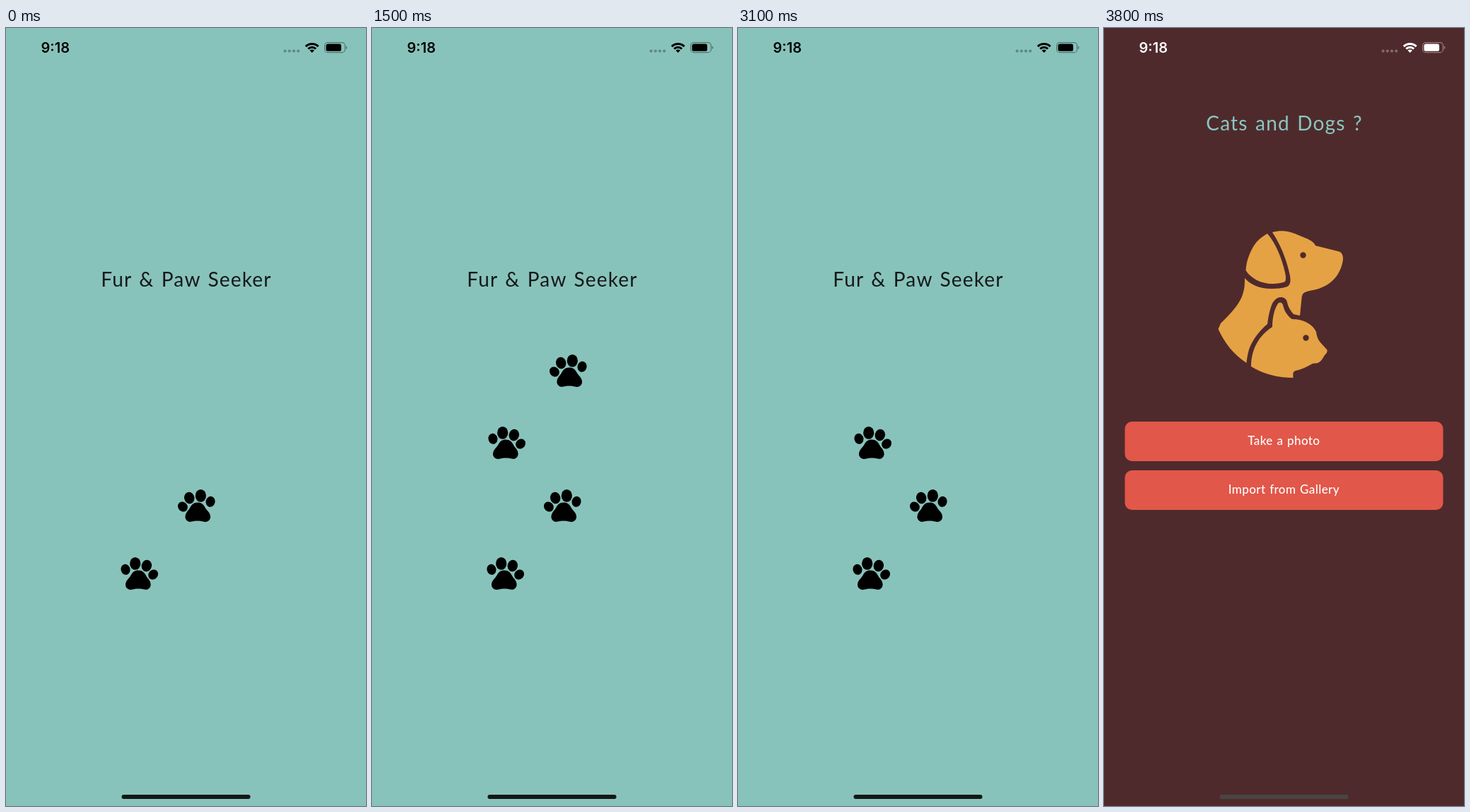
Recreate the animation shown at these times as an HTML page. Size 509 by 1101 pixels, loop 5300 ms.

```html
<!DOCTYPE html>
<html lang="en">
<head>
<meta charset="utf-8">
<title>Pet app</title>
<style>
  html, body { margin: 0; width: 100%; height: 100%; overflow: hidden; background: #88c3bb; }
  svg { display: block; width: 100vw; height: 100vh; }
  text { font-family: Lato, sans-serif; text-anchor: middle; }
  .title { font-size: 28px; letter-spacing: 1.2px; word-spacing: 2px; }
  .label { font-size: 17px; font-weight: 500; letter-spacing: .4px; word-spacing: 1px; fill: #fff; }
  .clock { font: 600 20px Inter, sans-serif; text-anchor: start; }

  .splash, .dim, .home, .bar, .indicator, .paw { animation: 5300ms step-end infinite; }
  .paw.a { animation-name: paw-a; }
  .paw.b { animation-name: paw-b; }
  .paw.c { animation-name: paw-c; }
  .paw.d { animation-name: paw-d; }
  .splash { animation-name: push; }
  .dim { animation-name: dim; }
  .home { animation-name: slide; }
  .bar { animation-name: bar; }
  .indicator { animation-name: indicator; }

  @keyframes paw-a { 0% { opacity: 1 } 35.84% { opacity: 0 } 47.16%, 100% { opacity: 1 } }
  @keyframes paw-b { 0% { opacity: 1 } 35.84% { opacity: 0 } 50.94%, 100% { opacity: 1 } }
  @keyframes paw-c { 0% { opacity: 0 } 5.66% { opacity: 1 } 35.84% { opacity: 0 } 58.49%, 100% { opacity: 1 } }
  @keyframes paw-d { 0% { opacity: 0 } 9.43% { opacity: 1 } 35.84% { opacity: 0 } 64.15%, 100% { opacity: 1 } }
  @keyframes push { 0% { transform: none } 69.81%, 100% { transform: translateX(-169px) } }
  @keyframes dim { 0% { opacity: 0 } 69.81%, 100% { opacity: .1 } }
  @keyframes slide {
    0% { opacity: 0; transform: translateX(2px) }
    69.81% { opacity: 1; transform: translateX(2px) }
    71.69%, 100% { opacity: 1; transform: none }
  }
  @keyframes bar { 0% { color: #000 } 67.92%, 100% { color: #fff } }
  @keyframes indicator { 0% { fill: #151718 } 69.81%, 100% { fill: #494545 } }
</style>
</head>
<body>
<svg viewBox="0 0 509 1101" preserveAspectRatio="none">
  <defs>
    <g id="paw">
      <ellipse cx="7" cy="17.3" rx="6.5" ry="7.6" transform="rotate(-15 7 17.3)"/>
      <ellipse cx="20.7" cy="8.9" rx="7.6" ry="8.9"/>
      <ellipse cx="36.8" cy="12" rx="7.2" ry="8.3" transform="rotate(15 36.8 12)"/>
      <ellipse cx="46.1" cy="24.5" rx="6.6" ry="7.4" transform="rotate(40 46.1 24.5)"/>
      <path d="M25 18.5C31 18.5 34 22 36 26C38 30 43 33 42.6 39.5C42 44 38 46.7 34 45.6C29 44 21 44 17 45.6C12 47 7 44 7 39C7 33 12 30 14.5 25.5C17 21 20 18.5 25 18.5Z"/>
    </g>
  </defs>

  <rect width="509" height="1101" fill="#88c3bb"/>
  <g class="splash">
    <text class="title" x="255" y="366" fill="#15191b">Fur &amp; Paw Seeker</text>
    <g class="paw a"><use href="#paw" x="162" y="749"/></g>
    <g class="paw b"><use href="#paw" transform="translate(296 653) scale(-1 1)"/></g>
    <g class="paw c"><use href="#paw" x="164" y="564"/></g>
    <g class="paw d"><use href="#paw" transform="translate(304 462) scale(-1 1)"/></g>
  </g>
  <rect class="dim" width="509" height="1101"/>

  <g class="home">
    <rect width="509" height="1101" fill="#4f2a2c"/>
    <text class="title" x="255" y="145" fill="#88c8c0">Cats and Dogs ?</text>
    <g fill="#e5a244">
      <path d="M231 291C224 295 217 300 212 308C206 318 201 330 200.5 343C207 354 222 362 238 362C245 362 250 361 255 359.5C258 358 257 351 256 346C251 325 243 305 231 291Z"/>
      <path d="M238 289C252 285 264 288 277 294C287 298 296 301 299 308L331 316C336 317 338 321 338 327C336 345 325 361 306 368C299 371 293 371 287 373C282 374 280 377 279.5 382L277 407L268 405C262 398 260 393 259 388C258 383 254 381 250 381C243 381 238 388 236 395C233 404 232 411 231 419C220 428 210 441 205 455C203 462 202 468 201.5 474C183 462 170 445 161.5 426L165 418C178 405 190 393 195 380C199 370 199 362 199 354C207 363 220 369 237 369C247 369 254 368 259 366C264 363 264 357 263 351C259 330 250 307 238 289Z"/>
      <path d="M238 423C238 410 241 397 246 390C249 387 252 389 253 392C255 401 260 408 266 412C282 412 295 419 300 430C301 436 302 440 306 445L315 455C317 458 314 461 312 463C309 468 306 473 302 474C299 475 295 474 293 476C287 479 280 483 271 485C267 486 267 489 267.5 495C246 495 226 490 208 479C208 456 218 436 238 423Z"/>
    </g>
    <g fill="#4f2a2c">
      <circle cx="281.5" cy="321.5" r="4.2"/>
      <circle cx="285.5" cy="438.5" r="4.2"/>
    </g>
    <g fill="#e1574a">
      <rect x="29.5" y="557" width="450" height="56" rx="10"/>
      <rect x="29.5" y="626" width="450" height="56" rx="10"/>
    </g>
    <text class="label" x="254.3" y="590">Take a photo</text>
    <text class="label" x="254.3" y="659">Import from Gallery</text>
  </g>

  <g class="bar" fill="currentColor">
    <text class="clock" x="49.5" y="35">9:18</text>
    <g opacity=".3">
      <circle cx="394.6" cy="32.6" r="2.1"/>
      <circle cx="400.8" cy="32.6" r="2.1"/>
      <circle cx="407" cy="32.6" r="2.1"/>
      <circle cx="413.2" cy="32.6" r="2.1"/>
    </g>
    <g fill="none" stroke="currentColor" stroke-width="3">
      <path d="M423.8 26.1A12.6 12.6 0 0 1 441.6 26.1"/>
      <path d="M427.2 29.5A7.8 7.8 0 0 1 438.2 29.5"/>
    </g>
    <path d="M432.7 35L429.5 31.8A4.6 4.6 0 0 1 435.9 31.8Z"/>
    <rect x="450.6" y="20.6" width="28.8" height="14" rx="4.2" fill="none" stroke="currentColor" stroke-width="1.2" opacity=".4"/>
    <rect x="452.5" y="22.4" width="21.5" height="10.4" rx="2.6"/>
    <path d="M480.8 25.2C482.8 26 482.8 29.2 480.8 30Z" opacity=".45"/>
  </g>
  <rect class="indicator" x="163.5" y="1085" width="182" height="6" rx="3"/>
</svg>
</body>
</html>
```
